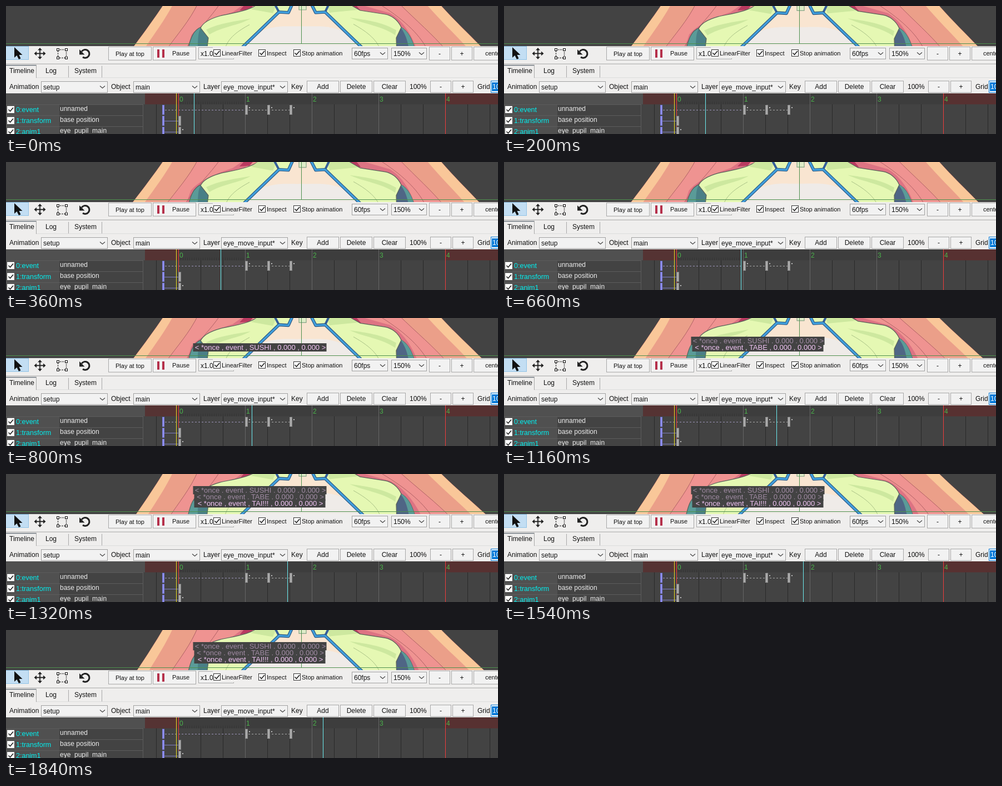
Recreate the animation shown at these times as an HTML page. Size 885 px wide and 233 px high, loop 1900 ms.

```html
<!DOCTYPE html>
<html lang="en">
<head>
<meta charset="utf-8">
<title>Timeline editor</title>
<style>
html, body { margin: 0; width: 100%; height: 100%; overflow: hidden; background: #434343; }
svg { display: block; width: 885px; height: 233px; }
text { font-family: "Liberation Sans", Arial, sans-serif; white-space: pre; }
.log text { font-size: 13px; text-anchor: middle; }
</style>
</head>
<body>
<svg id="stage" viewBox="0 0 885 233">
  <defs><clipPath id="view"><rect width="885" height="73"/></clipPath></defs>
  <rect width="885" height="73" fill="#434343"/>
  <g clip-path="url(#view)" stroke-linejoin="round">
    <g id="hairL">
      <path d="M286-6C270 18 249 47 224 80H400L480-6Z" fill="#ef9391" stroke="#7d4a4c" stroke-width="1.2"/>
      <path d="M286-6C270 18 249 47 224 80H287C307 52 330 27 346-6Z" fill="#eb9f89"/>
      <path d="M286-6C270 18 249 47 224 80H246C266 51 287 23 302-6Z" fill="#f9c799"/>
      <path d="M432-6L408 11C372 23 348 34 333 52L324 80H336L420 20L447-6Z" fill="#dd7383"/>
      <path d="M433-6L420 8L438 7L449-6Z" fill="#b93a60"/>
      <path d="M346-6C330 27 307 52 287 80M386-6C368 22 341 45 321 80" fill="none" stroke="#aa5c62" stroke-width=".9"/>
    </g>
    <g id="hairR">
      <path d="M590-6L680 80H856C832 53 805 27 778-6Z" fill="#ef9391" stroke="#7d4a4c" stroke-width="1.2"/>
      <path d="M706-6C738 28 766 53 787 80H856C832 53 805 27 778-6Z" fill="#eb9f89"/>
      <path d="M754-6C780 27 808 54 829 80H856C832 53 805 27 778-6Z" fill="#f9c799"/>
      <path d="M625-6L690 13C710 25 726 48 735 80H724L640 14L611-6Z" fill="#dd7383"/>
      <path d="M611-6L623 9L638 9L626-6Z" fill="#b93a60"/>
      <path d="M668-6C711 22 740 49 754 80M706-6C738 28 766 53 787 80" fill="none" stroke="#aa5c62" stroke-width=".9"/>
    </g>
    <g id="torso" stroke="#59605a" stroke-width="1.2">
      <path d="M413 90L491 11L517-8H547L574 11L652 90Z" fill="#efebe8" stroke="none"/>
      <path d="M517-8L508 12H491L447 53C476 32 509 38 531 37C558 38 588 32 618 53L574 11H557L547-8Z" fill="#f9e5d1" stroke="none"/>
      <path d="M352 38C337 43 331 58 325 90H368L366 52Z" fill="#5a9b98"/>
      <path d="M352 38C344 46 346 62 344 90H368L366 52Z" fill="#497f86" stroke="none"/>
      <path d="M708 37C724 45 731 60 739 90H699L703 52Z" fill="#4f6685"/>
      <path d="M708 37C719 50 724 66 726 90H739C731 60 724 45 708 37Z" fill="#5a9b98" stroke="none"/>
      <path d="M459-8C443 9 405 13 385 18C364 24 354 31 350 40L364 58L360 90H408L491 11H508L517-8Z" fill="#e5f8b3"/>
      <path d="M547-8L557 12L574 11L657 90H703L702 58L711 39C705 25 693 17 682 15L637 8L609-8Z" fill="#e5f8b3"/>
      <path d="M360 43C384 31 412 28 440 23C417 36 390 37 366 52ZM702 44C673 28 650 26 618 21C645 34 674 35 700 53ZM459-8L441 6L480 13L489-8ZM575-8L582 12L633 7L609-8Z" fill="#cde89f" stroke="none"/>
      <path d="M394 78C399 58 418 45 438 34M673 79C666 59 646 45 625 33" fill="none" stroke="#a9c186" stroke-width="1"/>
      <path d="M481-8L491 11M583-8L574 11" fill="none" stroke="#355f9a" stroke-width="4"/>
      <path d="M517-8L508 12L491 11L413 87M547-8L557 12L574 11L652 87" fill="none" stroke="#28537f" stroke-width="5.6"/>
      <path d="M517-8L508 12L491 11L413 87M547-8L557 12L574 11L652 87" fill="none" stroke="#419fdd" stroke-width="3.4"/>
      <path d="M527-8H540V7H527Z" fill="#dfecc8" stroke="#87a487"/>
    </g>
    <path d="M0 68.5H885M531.5 0V68" stroke="#4d8f4d" fill="none"/>
    <g id="log" class="log"></g>
  </g>
  <g id="ui"></g>
  <path id="playhead" d="M.5 159V233" stroke="#6cecf0"/>
</svg>
<script>
const $ = id => document.getElementById(id);
const ui = $('ui');

function add(parent, tag, attrs, content = '') {
  const el = document.createElementNS('http://www.w3.org/2000/svg', tag);
  for (const key in attrs) el.setAttribute(key, attrs[key]);
  el.textContent = content;
  return parent.appendChild(el);
}
const box = (x, y, width, height, fill) => add(ui, 'rect', {x, y, width, height, fill});
const frame = (x, y, w, h, fill, stroke) =>
  add(ui, 'rect', {x: x + .5, y: y + .5, width: w - 1, height: h - 1, fill, stroke});
const path = (d, stroke, fill = 'none', width = 1) =>
  add(ui, 'path', {d, stroke, fill, 'stroke-width': width});
const label = (x, y, str, size = 12, fill = '#111', anchor = 'start') =>
  add(ui, 'text', {x, y, fill, 'font-size': size, 'text-anchor': anchor}, str);
const vline = (x, y, color) => box(x, y, 1, 233 - y, color);

function button(x, y, w, h, str, size = 12) {
  frame(x, y, w, h, '#f2f2f2', '#a8a8a8');
  label(x + w / 2, y + h / 2 + 4, str, size, '#111', 'middle');
}
function combo(x, y, w, str) {
  const h = 21, mid = y + h / 2;
  frame(x, y, w, h, '#f2f2f2', '#a0a0a0');
  label(x + 4, mid + 4, str);
  box(x + w - 19, y + 1, 18, h - 2, '#f2f2f2');
  path(`M${x + w - 14} ${mid - 2}l4.5 4l4.5-4`, '#444', 'none', 1.2);
}
function check(x, y, border = '#333') {
  frame(x, y, 13, 13, '#fff', border);
  path(`M${x + 2.5} ${y + 6.5}l3 3l5.5-6.5`, '#222', 'none', 1.6);
}

// Main toolbar
box(0, 73, 885, 86, '#efeeed');
frame(-1, 73, 42, 25, '#c3def3', '#91c3e6');
path('M15 75V94L19.5 90L23 97L26.5 95.5L23.5 89H29.5Z', 'none', '#111');
path('M61 79V94M53.5 86.5H68.5', '#222', 'none', 1.8);
path('M61 76l4 4.5h-8zM61 97l4-4.5h-8zM50.5 86.5l4.5-4v8zM71.5 86.5l-4.5-4v8z', 'none', '#222');
add(ui, 'rect', {x: 93.5, y: 79.5, width: 15, height: 15, fill: 'none', stroke: '#222', 'stroke-width': 1.5, 'stroke-dasharray': '2 2'});
for (const x of [91, 106]) for (const y of [77, 92]) frame(x, y, 5, 5, '#f0efee', '#111');
path('M136 83A7.5 7.5 0 1 1 138 93', '#222', 'none', 3);
path('M132 79V88.5H141.5Z', 'none', '#222');
button(184, 74, 78, 25, 'Play at top', 11);
frame(264, 74, 78, 25, '#f2f2f2', '#a8a8a8');
box(272, 79, 4, 15, '#b5304b');
box(281, 79, 4, 15, '#b5304b');
label(299, 90, 'Pause', 11);
frame(346, 75, 64, 22, '#f2f2f2', '#aaa');
label(350, 91, 'x1.0');
box(372, 74, 240, 21, '#efeeed');
[[373, 'LinearFilter'], [454, 'Inspect'], [517, 'Stop animation']].forEach(([x, str]) => {
  check(x, 79);
  label(x + 15, 90, str, 11);
});
combo(622, 76, 65, '60fps');
combo(693, 76, 64, '150%');
button(761, 74, 38, 25, '-');
button(801, 74, 38, 25, '+');
frame(841, 74, 60, 25, '#f2f2f2', '#a8a8a8');
label(862, 90, 'center', 11);

// Tabs
box(0, 105, 885, 1, '#a9a9a9');
box(54, 130, 831, 1, '#dcdcdc');
box(0, 107, 54, 2, '#8d9399');
path('M54.5 107V131M112.5 109V130M172.5 109V130', '#a8a8a8');
label(6, 122, 'Timeline');
label(71, 122, 'Log');
label(123, 122, 'System');

// Selection row
label(6, 151, 'Animation');
combo(63, 137, 120, 'setup');
label(189, 151, 'Object');
combo(229, 137, 120, 'main');
label(355, 151, 'Layer');
combo(387, 137, 120, 'eye_move_input*');
label(513, 151, 'Key');
button(541, 136, 58, 22, 'Add');
button(601, 136, 58, 22, 'Delete');
button(661, 136, 58, 22, 'Clear');
label(726, 151, '100%');
button(763, 136, 38, 22, '-');
button(803, 136, 38, 22, '+');
label(848, 151, 'Grid');
frame(872, 136, 30, 22, '#fff', '#0078d7');
box(874, 139, 11, 16, '#0078d7');
label(875, 151, '10', 12, '#fff');

// Timeline
box(0, 159, 885, 74, '#434343');
box(0, 159, 250, 20, '#505050');
box(0, 179, 96, 54, '#505050');
box(250, 159, 61, 20, '#553333');
box(311, 159, 479, 20, '#3d3d3d');
box(790, 159, 95, 20, '#573131');
for (let x = 314; x < 430; x += 4) vline(x, 174, '#353535').setAttribute('height', 5);
for (let x = 270; x < 885; x += 40) vline(x, 179, '#292929');
for (let n = 0; n < 5; n++) {
  const x = 310 + n * 120;
  vline(x, 159, '#666');
  label(x + 2, 174, n, 12, '#4bb34b');
}
['unnamed', 'base position', 'eye_pupil_main'].forEach((name, row) => {
  const y = 179 + row * 20;
  box(0, y, 246, 1, '#5c5c5c');
  box(246, y, 1, 20, '#5c5c5c');
  check(2, y + 3, '#eee');
  label(18, y + 14, ['0:event', '1:transform', '2:anim1'][row], 12.5, '#00f0f0');
  label(97, y + 12, name, 12, '#eee');
  frame(281, y + 1, 4, 18, '#9292f2', '#7777d6');
  if (row) box(285, y + 10, 26, 1, '#8080c4');
});
path('M286 189.5H430', '#9c94b8').setAttribute('stroke-dasharray', '3 3');
path('M436 189.5H511', '#aaa').setAttribute('stroke-dasharray', '3 3');
vline(310, 159, '#f23b3b');
vline(790, 159, '#f23b3b');
vline(306, 159, '#eddf22');
function key(x, y) {
  frame(x, y, 5, 18, '#aaa', '#858585');
  box(x + 7, y + 4, 2, 2, '#bbb');
}
for (const x of [430, 470, 510]) key(x, 180);
frame(310, 200, 5, 18, '#aaa', '#858585');
key(310, 220);

// Event log, newest line at the bottom
const events = [[431, 'SUSHI', 120], [471, 'TABE', 118], [511, 'TAI!!!', 118]];
const lines = events.map(([at, word, half]) => {
  const g = add($('log'), 'g', {});
  add(g, 'rect', {x: 456.5 - half, y: 46, width: half * 2, height: 15, fill: '#434343'});
  const text = add(g, 'text', {x: 457.5, y: 58}, `< *once , event , ${word} , 0.000 , 0.000 >`);
  return {g, text, at};
});

const LOOP = 1900, STEP = 73.6;
const wave = (t, peak, period) => Math.cos(2 * Math.PI * (t - peak) / period);
const sway = (id, dx) => $(id).setAttribute('transform', `matrix(1 0 ${dx / 73} 1 0 0)`);

function draw(now) {
  const t = now % LOOP;
  const step = Math.min(25, Math.floor((Math.floor(t / 20) * 20 + 19.9) / STEP));
  const time = step * STEP;
  // The playhead is redrawn every 8 px; events fire at its exact position.
  const ticks = step * 1.155 + .92;
  const position = 338 + 8 * ticks;
  $('playhead').setAttribute('transform', `translate(${338 + 8 * Math.floor(ticks)})`);
  sway('hairL', 3 - 4 * wave(time, 450, 2600));
  sway('hairR', 7 - 6 * wave(time, 350, 2200));
  $('torso').setAttribute('transform', `translate(0 ${3 * Math.sin(2 * Math.PI * time / LOOP)})`);
  const shown = lines.filter(line => position >= line.at).length;
  lines.forEach(({g, text}, i) => {
    g.setAttribute('visibility', i < shown ? 'visible' : 'hidden');
    g.setAttribute('transform', `translate(0 ${(i + 1 - shown) * 12})`);
    text.setAttribute('fill', i === shown - 1 ? '#f0c3f3' : '#9f8aa2');
  });
}
const origin = performance.now();
function tick() {
  draw(performance.now() - origin);
  requestAnimationFrame(tick);
}
tick();
</script>
</body>
</html>
```
